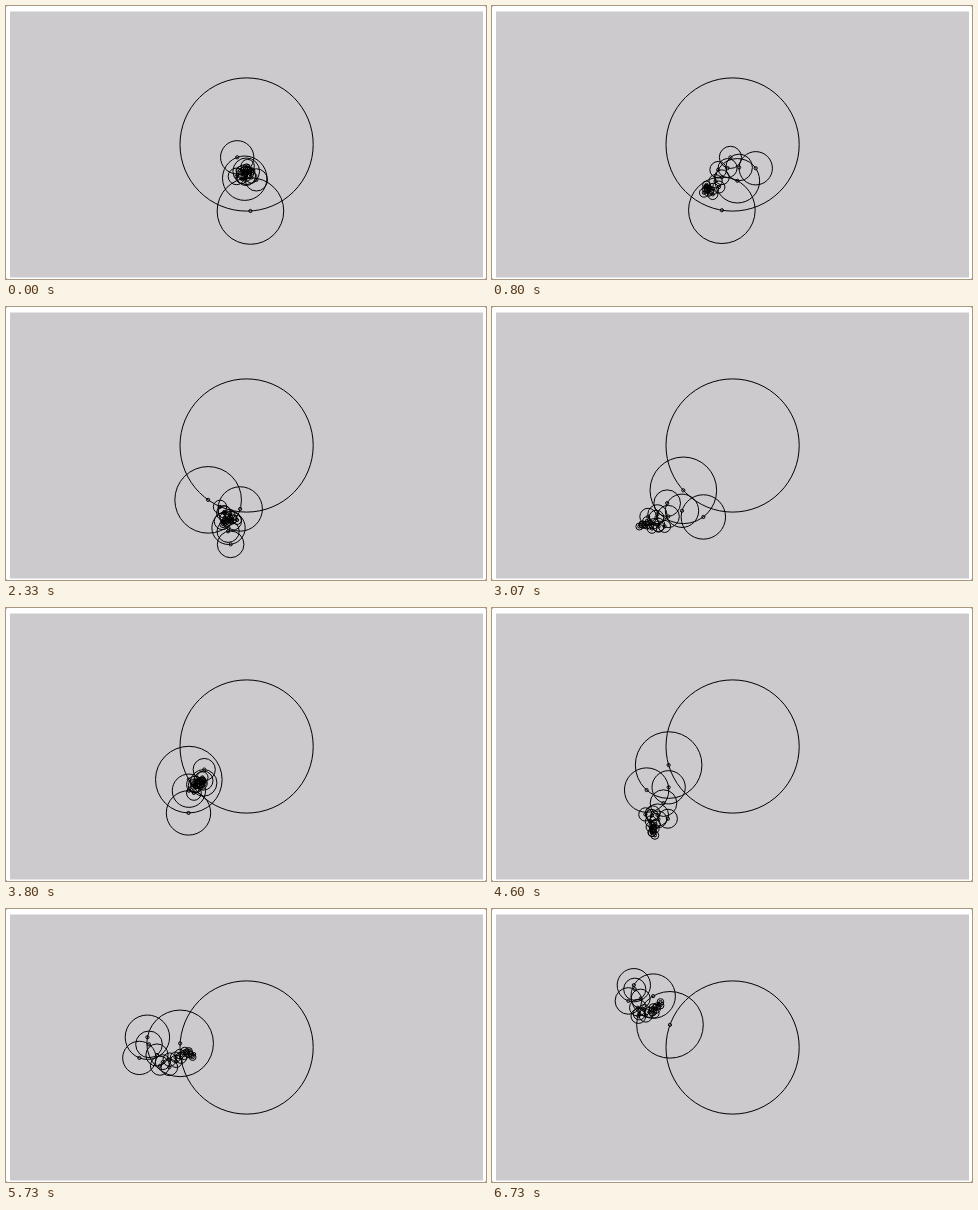
Recreate the animation shown at these times as an HTML page with a canvas. Size 480 by 273 pixels, loop 6.79 s.

```html
<!DOCTYPE html>
<html lang="en">
<head>
<meta charset="utf-8">
<title>Epicycles</title>
<style>
  html, body { margin: 0; width: 100%; height: 100%; overflow: hidden; background: #666; }
  canvas { display: block; background: #fff; border-radius: 2px; }
</style>
</head>
<body>
<canvas width="480" height="273"></canvas>
<script>
const ctx = document.querySelector('canvas').getContext('2d');
const LOOP = 6790, STEP = 200 / 3, LAST = 101;
const CENTRE = [240.6, 138.5], RADIUS = 66.6, COUNT = 20;

// [step, degrees]: the base turn is nearly uniform, with slight pace changes
const PACE = [[0, -3.3], [12, 9.28], [24, 22.85], [46, 47.7], [69, 73.8], [86, 93.55], [101, 109.9]];

function turnAt(step) {
  const i = Math.max(1, PACE.findIndex(p => p[0] >= step));
  const [a, from] = PACE[i - 1], [b, to] = PACE[i];
  return from + (to - from) * (step - a) / (b - a);
}

function ring(x, y, r) {
  ctx.beginPath();
  ctx.arc(x, y, r, 0, 2 * Math.PI);
  ctx.stroke();
}

function draw(turn) {
  ctx.fillStyle = '#fff';
  ctx.fillRect(0, 0, 480, 273);
  ctx.fillStyle = '#cccacd';
  ctx.fillRect(4, 5.5, 473, 266);
  ctx.strokeStyle = '#000';
  ctx.lineWidth = 1;

  let [x, y] = CENTRE;
  for (let n = 1; n <= COUNT; n++) {
    const r = RADIUS / n;
    ring(x, y, r);
    // Each arm turns n times the base turn relative to the one before it
    const degrees = 90 + turn * n * (n + 1) / 2 + 180 * Math.floor(n / 2);
    const angle = degrees * Math.PI / 180;
    x += r * Math.cos(angle);
    y += r * Math.sin(angle);
    ring(x, y, 1.6);
  }
}

function tick() {
  const time = performance.now() % LOOP;
  draw(turnAt(Math.min(LAST, Math.floor((time + 5) / STEP))));
  requestAnimationFrame(tick);
}
tick();
</script>
</body>
</html>
```
